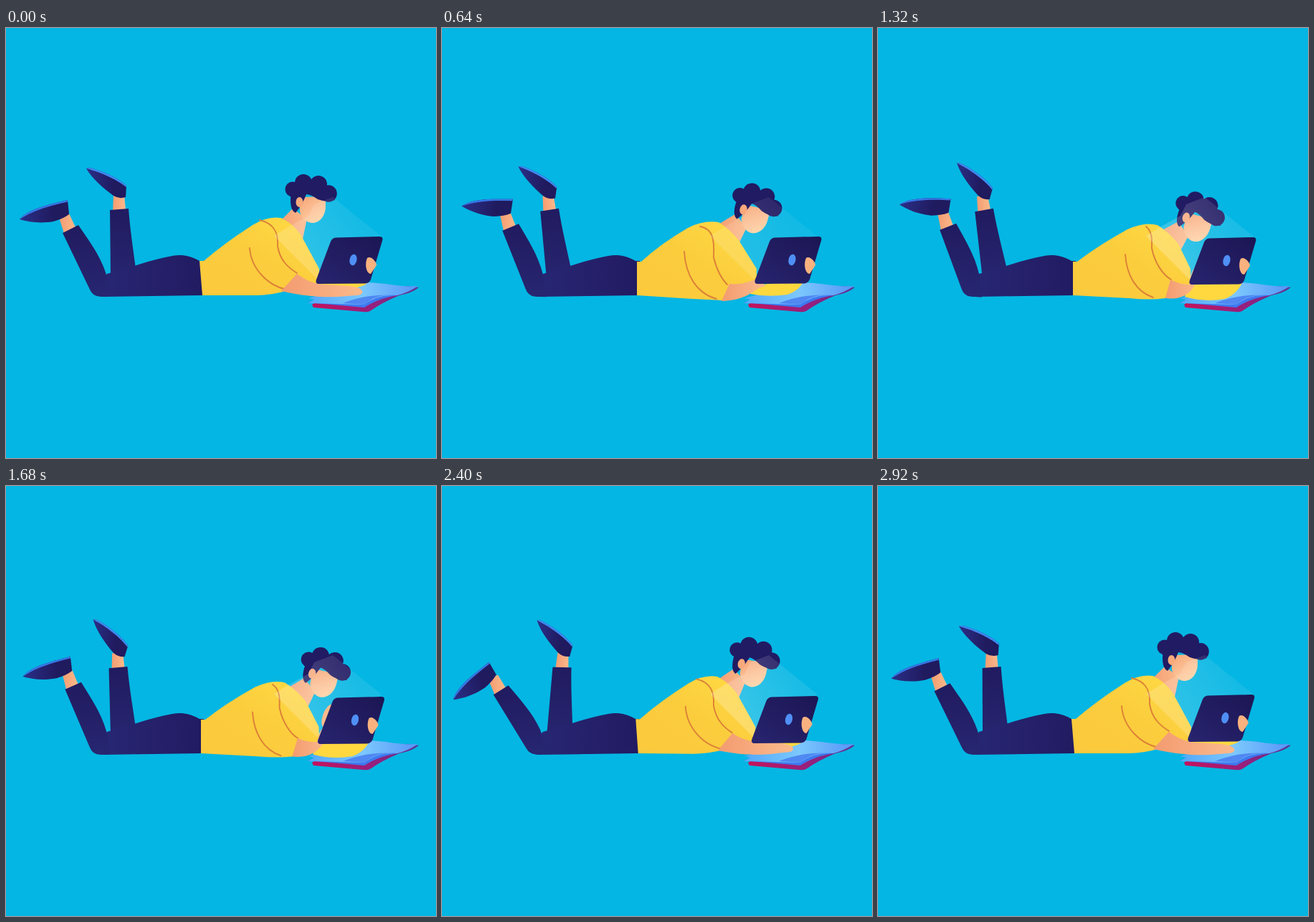
Recreate the animation shown at these times as an HTML page. Size 600 px wide and 600 px high, loop 2960 ms.

```html
<!DOCTYPE html>
<html lang="en">
<head>
<meta charset="utf-8">
<title>Reading on a tablet</title>
<style>
  html, body { margin: 0; width: 100%; height: 100%; overflow: hidden; background: #04b6e3; }
  svg { display: block; width: 100vw; height: 100vh; }
</style>
</head>
<body>
<svg viewBox="0 0 600 600">
  <defs>
    <linearGradient id="thighFill" x1="0" x2="1">
      <stop offset="0" stop-color="#272876"/><stop offset=".5" stop-color="#26216b"/><stop offset="1" stop-color="#211b62"/>
    </linearGradient>
    <linearGradient id="calfFill" x1="0" y1="0" x2="0" y2="1">
      <stop offset="0" stop-color="#211b60"/><stop offset="1" stop-color="#272671"/>
    </linearGradient>
    <linearGradient id="shoeFill" x1="0" y1="0" x2="1" y2="0">
      <stop offset="0" stop-color="#2a2f88"/><stop offset=".7" stop-color="#201a5e"/>
    </linearGradient>
    <linearGradient id="shirtFill" x1="0" y1="1" x2="1" y2="0">
      <stop offset="0" stop-color="#fbc93d"/><stop offset=".5" stop-color="#fbcd3d"/><stop offset="1" stop-color="#ffdc45"/>
    </linearGradient>
    <linearGradient id="skinFill" x1="0" x2="1">
      <stop offset="0" stop-color="#f39b70"/><stop offset="1" stop-color="#fbba8c"/>
    </linearGradient>
    <linearGradient id="faceFill" x1="0" y1="0" x2=".7" y2="1">
      <stop offset="0" stop-color="#f5a475"/><stop offset=".6" stop-color="#fcc196"/><stop offset="1" stop-color="#ffd3a3"/>
    </linearGradient>
    <linearGradient id="pageFill" x1="0" x2="1">
      <stop offset="0" stop-color="#52a8fa"/><stop offset=".5" stop-color="#7cc8fd"/><stop offset="1" stop-color="#5596f8"/>
    </linearGradient>
    <linearGradient id="coverFill" x1="0" x2="1">
      <stop offset="0" stop-color="#c4125d"/><stop offset=".6" stop-color="#93217f"/><stop offset="1" stop-color="#5b3390"/>
    </linearGradient>
    <linearGradient id="tabletFill" x1="0" y1="1" x2="1" y2="0">
      <stop offset="0" stop-color="#28246f"/><stop offset="1" stop-color="#1c1654"/>
    </linearGradient>
    <linearGradient id="beamFill" gradientUnits="userSpaceOnUse" x1="385" y1="310" x2="480" y2="250">
      <stop offset="0" stop-color="#fff" stop-opacity=".24"/><stop offset="1" stop-color="#fff" stop-opacity=".09"/>
    </linearGradient>
  </defs>

  <g id="calf2">
    <path d="M150 233L165 233L167 254L149 256Z" fill="url(#skinFill)"/>
    <path d="M145 254L171 252C173 280 177 305 181 336L163 356L146 346Z" fill="url(#calfFill)"/>
    <g id="shoe2">
      <path d="M112 196Q116 194 124 197C143 203 160 212 168 220L167 236Q158 239 150 234C136 224 120 210 112 196Z" fill="url(#shoeFill)"/>
      <path d="M112 196Q116 194 124 197C143 203 160 212 168 220L167.500 222C156 212 132 201 112 196Z" fill="#3f8bf4"/>
    </g>
  </g>
  <path d="M276 325L270 325C256 317 244 316 232 318C202 323 172 335 141 343L120 362Q124 376 136 375L276 373Z" fill="url(#thighFill)"/>
  <g id="calf1">
    <path d="M74 264L88 259L97 278L81 287Z" fill="url(#skinFill)"/>
    <path d="M79 286L101 275C116 297 131 317 139 341L146 374L130 374.500Q121 374 117 365Z" fill="url(#calfFill)"/>
    <g id="shoe1">
      <path d="M19 267C31 252 62 246 86 240L88 260Q80 266 66 270C48 273 32 271 19 267Z" fill="url(#shoeFill)"/>
      <path d="M19 267C31 252 62 246 86 240L86 242.500C66 247 40 253 19 267Z" fill="#3778e8"/>
    </g>
  </g>

  <path d="M427 386L430 384L560 360L576 362Q566 370 549 373Q525 383 508 395Q504 397 498 396L429 390Z" fill="url(#coverFill)"/>
  <path d="M421 383L440 376L520 362L546 373Q520 377 500 390Z" fill="#3e79ef"/>
  <path d="M422 377L500 355C530 355 550 362 575 360Q562 369 546 373C522 372 511 378 500 386L421 384L430 379Z" fill="url(#pageFill)"/>
  <path d="M546 373C522 371 511 377 500 386L470 384Q505 370 546 373Z" fill="#3f70ee" opacity=".7"/>

  <path id="farSleeve" fill="#ffd83f"/>
  <g class="head"><path d="M400 252L376 276L412 304L420 266Z" fill="url(#skinFill)"/></g>
  <path id="shirt" fill="url(#shirtFill)"/>
  <g fill="none" stroke="#dc8038" stroke-width="1.900" stroke-linecap="round">
    <path id="seam"/><path id="armpit"/>
  </g>
  <path id="arm" fill="url(#skinFill)"/>
  <g class="head">
    <path d="M410 236L446 235L446 248C446 263 437 272 428 272C420 272 414 266 410 257Z" fill="url(#faceFill)"/>
    <path d="M398 222L412 212L435 214L456 228L459 240Q448 244 435 239Q425 232 419 232Q414 246 404 258Q397 255 397 240Z" fill="#211b63"/>
    <g fill="#211b63">
      <circle cx="400" cy="225" r="10.500"/><circle cx="415" cy="216" r="12"/>
      <circle cx="436" cy="218" r="12"/><circle cx="450" cy="231" r="11.800"/>
    </g>
    <ellipse cx="409.500" cy="243" rx="5" ry="7" fill="#f7a97c"/>
  </g>
  <path id="beam" d="M374 290L395 277L422 262L430 246L456 236L524 291L434 350Z" fill="url(#beamFill)"/>
  <ellipse id="hand" cx="457" cy="318" rx="7.500" ry="17" fill="#fbba8c"/>
  <g id="tablet">
    <path d="M460 292.500L521 291Q527 291 525 297L509 351Q507 356 501 356.500L437 357Q431 357 433 351L453 298Q455 293 460 292.500Z" fill="url(#tabletFill)"/>
    <ellipse cx="484.500" cy="323.500" rx="5" ry="7.800" transform="rotate(12 484.500 323.500)" fill="#4f8ff5"/>
    <path d="M504 321C509 317 517 326 517 331L509 343C503 343 500 330 504 321Z" fill="#f9b27f"/>
  </g>
</svg>
<script>
const PERIOD = 2960, STEP = 40;
const times = [0, 640, 1320, 1680, 2120, 2400];

// Values of each moving part at the key times
const tracks = {
  calf1:   [0, 4, 5.4, 2.6, -3.8, -5.8],
  shoe1:   [0, 10.3, 9.8, -3.6, -21, -18.7],
  calf2:   [0, -4.7, -5.9, -.9, 5.6, 5.6],
  shoe2:   [0, 9.4, 17.7, 14.7, 7.4, 6.2],
  headX:   [0, 12.5, 22, 19, 13.5, 9.5],
  headY:   [0, 14.5, 26.5, 23, 15.5, 8.5],
  headR:   [0, 14, 16.5, 14, 12.5, 11],
  tabletX: [0, 4, 2, 2.5, .5, -.5],
  tabletY: [0, 0, 1, 3, 3, 2],
  pose:    [0, 1, 2, 1.85, .9, .15],
  hand:    [0, 0, 0, 1, 0, 0],
  beam:    [.8, .6, 1, .9, 1, 1]
};

// Paths for the raised, middle and lowered upper body
const poses = {
  shirt: [
    'M270 325L276 325Q305 300 344 275Q364 262 384 265Q400 273 411 288L437 336L437 360L410 352L394 366Q370 373 350 373L274 373Z',
    'M272 326L278 326Q305 301 343 279Q364 268 386 271Q402 281 414 296L439 336L439 360L405 366L391 380Q372 379 350 378L272 373Z',
    'M272 326L278 326Q308 303 348 281Q372 270 390 275Q406 285 419 301L436 336L437 362L410 362L401 377Q380 380 350 377L272 373Z'],
  seam: [
    'M354 268C376 273 380 288 379 304C382 325 395 335 406 342',
    'M360 277C380 280 380 300 379 320C384 340 390 350 398 358',
    'M374 277C384 285 382 300 382 307C386 328 398 345 409 351'],
  armpit: [
    'M340 307C342 335 365 362 398 366',
    'M338 312C340 345 355 370 383 378',
    'M345 316C347 345 360 368 384 376'],
  arm: [
    'M406 343C418 352 430 357 445 358C460 359 475 359 485 361C500 363 501 372 490 373C470 374 440 380 384 367Z',
    'M401 357C415 358 424 356 434 352C440 348 445 352 448 356C452 360 450 361 445 362C434 366 425 380 390 381Z',
    'M408 351C416 355 424 358 434 358C437 340 440 334 446 334C452 334 448 350 440 362C434 370 425 380 401 377Z'],
  farSleeve: [
    'M437 354L508 350Q505 359 490 362Q460 363 437 360Z',
    'M433 360L506 350Q500 366 482 372Q455 376 430 371Z',
    'M434 355L510 350Q504 370 484 378Q455 383 428 375Z']
};

const byId = id => document.getElementById(id);
const move = (el, value) => el.setAttribute('transform', value);

// Periodic cubic through the key values
function sample(values, t) {
  const n = times.length;
  const timeAt = i => times[(i + n) % n] + PERIOD * Math.floor(i / n);
  const valueAt = i => values[(i + n) % n];
  const slope = i => (valueAt(i + 1) - valueAt(i - 1)) / (timeAt(i + 1) - timeAt(i - 1));
  let i = n - 1;
  while (times[i] > t) i--;
  const span = timeAt(i + 1) - times[i], u = (t - times[i]) / span, v = 1 - u;
  return v * v * ((1 + 2 * u) * valueAt(i) + u * span * slope(i)) +
         u * u * ((3 - 2 * u) * valueAt(i + 1) - v * span * slope(i + 1));
}

function blend(paths, pose) {
  const i = pose < 1 ? 0 : 1, u = pose - i;
  const ends = paths[i + 1].match(/[\d.]+/g);
  let n = 0;
  return paths[i].replace(/[\d.]+/g, a => (+a + (ends[n++] - a) * u).toFixed(2));
}

function draw(now) {
  const t = Math.floor(now % PERIOD / STEP) * STEP, s = {};
  for (const name in tracks) s[name] = sample(tracks[name], t);
  const pose = Math.min(2, Math.max(0, s.pose));
  for (const name in poses) byId(name).setAttribute('d', blend(poses[name], pose));

  move(byId('calf1'), `rotate(${s.calf1} 128 360)`);
  move(byId('shoe1'), `rotate(${s.shoe1} 82 266)`);
  move(byId('calf2'), `rotate(${s.calf2} 163 350)`);
  move(byId('shoe2'), `rotate(${s.shoe2} 158 238)`);
  for (const el of document.querySelectorAll('.head'))
    move(el, `translate(${s.headX} ${s.headY}) rotate(${s.headR} 426 235)`);
  move(byId('tablet'), `translate(${s.tabletX} ${s.tabletY})`);
  const reach = Math.max(0, s.hand);
  move(byId('hand'), `translate(${s.tabletX - 10 * reach} ${s.tabletY}) rotate(20 457 318)`);
  byId('hand').setAttribute('opacity', reach > .05 ? 1 : 0);
  byId('beam').setAttribute('opacity', s.beam);
}

const start = performance.now();
function tick() {
  draw(performance.now() - start);
  requestAnimationFrame(tick);
}
tick();
</script>
</body>
</html>
```
